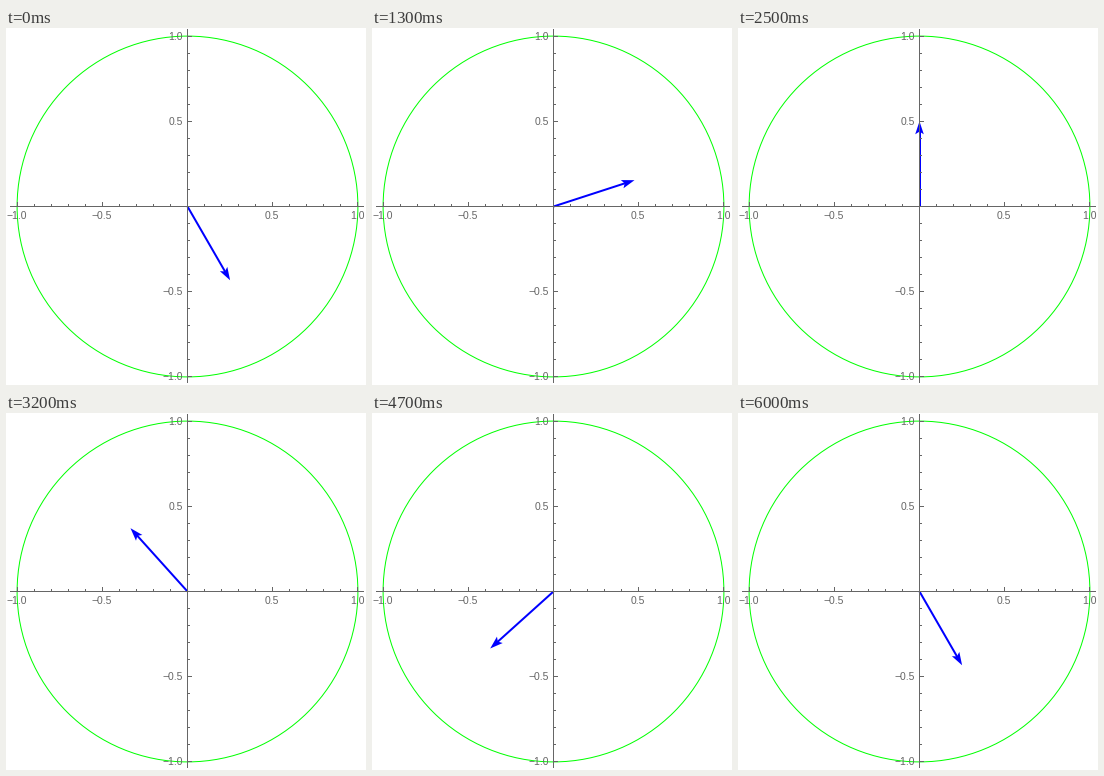
A matplotlib script for the animation above (6.1 s loop, 360x357 px).

```python
import numpy as np
import matplotlib.pyplot as plt
from matplotlib.animation import FuncAnimation
from matplotlib.patches import Circle, Polygon, Rectangle

W, H = 360, 357
DPI = 64
PT = 72 / DPI                    # points per pixel
CX, CY, UNIT = 181.5, 178.5, 170.4
REACH = 1.04 * UNIT              # half length of each axis
GRAY = "#666666"
BLUE = "#0000ff"
FRAMES, STEP_MS = 61, 100
HEAD = np.array([(0, 0), (-13, 4.3), (-10.3, 0), (-13, -4.3)])

plt.rcParams["font.family"] = "Liberation Sans"
fig = plt.figure(figsize=(W / DPI, H / DPI), dpi=DPI, facecolor="white")
ax = fig.add_axes([0, 0, 1, 1])
ax.set_xlim(0, W)
ax.set_ylim(H, 0)
ax.axis("off")


def bar(x, y, w, h):
    ax.add_patch(Rectangle((x, y), w, h, fc=GRAY, lw=0, zorder=4))


def label(x, y, value, ha):
    text = f"{value:.1f}".replace("-", "\u2212")
    ax.text(x, y, text, ha=ha, va="baseline", color=GRAY,
            fontsize=10.4 * PT, zorder=5)


def draw_axes():
    x0, y0 = int(CX), int(CY)
    bar(round(CX - REACH), y0, round(2 * REACH), 1)
    bar(x0, round(CY - REACH), 1, round(2 * REACH))
    for i in range(-10, 11):
        if i == 0:
            continue
        major = i % 5 == 0
        size = 4 if major else 2
        x = int(CX + UNIT * i / 10)
        y = int(CY - UNIT * i / 10)
        bar(x, y0 - size, 1, size)
        bar(x0 + 1, y, size, 1)
        if major:
            label(x, 191, i / 10, "center")
            label(177, y + 4, i / 10, "right")


ax.add_patch(Circle((CX, CY), UNIT, fill=False, ec="#00ff00", lw=PT, zorder=1))
draw_axes()
shaft, = ax.plot([], [], color=BLUE, lw=2 * PT, solid_capstyle="butt", zorder=2)
head = ax.add_patch(Polygon(HEAD, closed=True, fc=BLUE, lw=0, zorder=3))


def update(i):
    angle = np.radians(6 * i - 60)
    along = np.array([np.cos(angle), -np.sin(angle)])
    across = np.array([along[1], -along[0]])
    center = np.array([CX, CY])
    tip = center + UNIT / 2 * along
    points = tip + HEAD @ np.array([along, across])
    head.set_xy(points)
    shaft.set_data(*zip(center, points[2] + along))
    return shaft, head


anim = FuncAnimation(fig, update, frames=FRAMES, interval=STEP_MS,
                     repeat=True, repeat_delay=0, blit=False)
plt.show()
```
